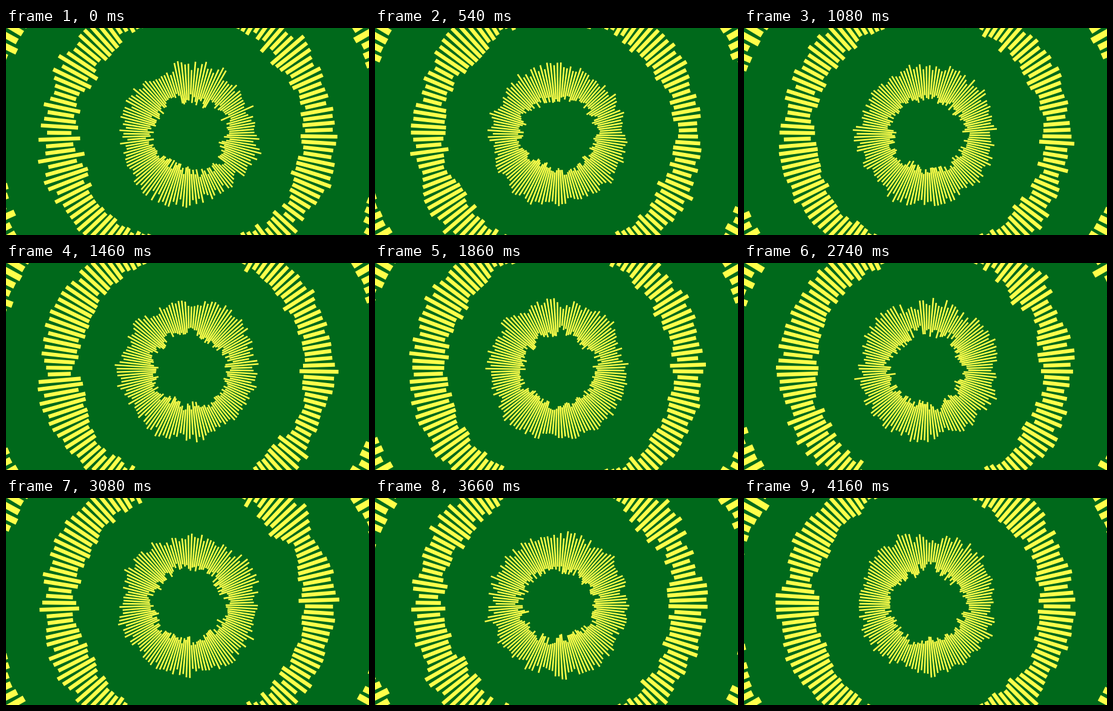
Write an HTML page with a canvas that moves like this. It is 600 by 343 pixels and loops after 4180 ms.

```html
<!DOCTYPE html>
<html lang="en">
<head>
<meta charset="utf-8">
<title>Radial bars</title>
<style>
html, body { margin: 0; width: 100%; height: 100%; overflow: hidden; background: #00691b; }
canvas { display: block; }
</style>
</head>
<body>
<canvas id="stage" width="600" height="343"></canvas>
<script>
const ctx = document.getElementById('stage').getContext('2d');
const LOOP = 4180, STEP = 20, BARS = 130, PHASE = 0.014;
const CX = 302.7, CY = 176.7;

// Resting bar lengths, evenly spaced clockwise from the right
const profile = [48, 48, 44, 45, 50, 50, 50, 50, 50, 50, 57, 54,
                 59, 43, 53, 57, 46, 45, 45, 45, 48, 57, 50, 44];
const rings = [
  { radius: 87, rest: () => 52 },
  { radius: 214.7, rest: u => sample(profile, u) },
  { radius: 345, rest: () => 49 }
];

const mix = (a, b, k) => a + (b - a) * k;
const ease = k => k * k * (3 - 2 * k);

function sample(list, u) {
  const x = u * list.length, i = Math.floor(x);
  return mix(list[i % list.length], list[(i + 1) % list.length], x - i);
}

function hash(x, y, seed) {
  let h = Math.imul(x + 1, 374761393) ^ Math.imul(y + 1, 668265263) ^ Math.imul(seed + 1, 1442695041);
  h = Math.imul(h ^ (h >>> 15), 2246822519);
  h = Math.imul(h ^ (h >>> 13), 3266489917);
  return ((h ^ (h >>> 16)) >>> 0) / 4294967296;
}

// Smooth noise from -0.5 to 0.5, wrapping around the ring
function noise(x, y, wrap, seed) {
  const i = Math.floor(x), j = Math.floor(y);
  const kx = ease(x - i), ky = ease(y - j);
  const row = n => mix(hash(i % wrap, n, seed), hash((i + 1) % wrap, n, seed), kx);
  return mix(row(j), row(j + 1), ky) - 0.5;
}

function draw(t) {
  ctx.setTransform(1, 0, 0, 1, 0, 0);
  ctx.fillStyle = '#00691b';
  ctx.fillRect(0, 0, 600, 343);
  ctx.fillStyle = '#ffff4a';
  rings.forEach(({ radius, rest }, r) => {
    const width = radius * 0.03;
    for (let i = 0; i < BARS; i++) {
      const swell = noise(i / 5, t / 700, BARS / 5, r) * 28;
      const jitter = noise(i, t / 400, BARS, r + 10) * 34;
      const length = Math.max(18, rest(i / BARS) + swell + jitter);
      const angle = PHASE + i / BARS * Math.PI * 2;
      const c = Math.cos(angle), s = Math.sin(angle);
      ctx.setTransform(c, s, -s, c, CX, CY);
      ctx.fillRect(radius - length / 2, -width / 2, length, width);
    }
  });
}

const start = performance.now();
function frame() {
  const t = (performance.now() - start) % LOOP;
  draw(Math.floor(t / STEP) * STEP);
  requestAnimationFrame(frame);
}
frame();
</script>
</body>
</html>
```
